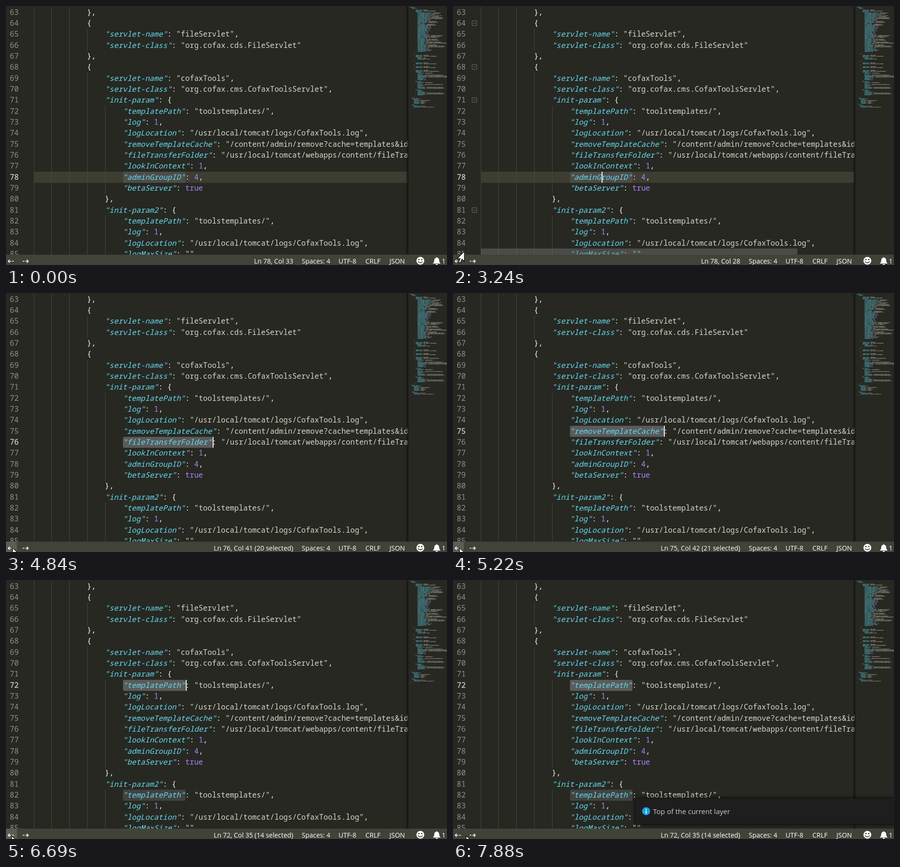
Animation of 935x550 px, one loop 8 s. Source, as an HTML page with a canvas:

```html
<!DOCTYPE html>
<html lang="en">
<head>
<meta charset="utf-8">
<title>JSON editor</title>
<style>
  html, body { margin: 0; width: 100%; height: 100%; overflow: hidden; background: #272822; }
  canvas { display: block; }
</style>
</head>
<body>
<canvas id="stage" width="935" height="550"></canvas>
<script>
const W = 935, H = 550, LOOP = 8000;
const LEFT = 59, RIGHT = 851, BAR = 528;
const CHAR = 9.47, ROW = 23.33, FIRST = 63, LAST = 85;
const MONO = '500 15.78px "Noto Sans Mono", monospace';
const UI = '"Open Sans", "Noto Sans", sans-serif';
const KEY = '#66d9ef', STRING = '#d6d6ca', NUMBER = '#ae81ff', PLAIN = '#f8f8f2';

// One document line per row: indent level, optional key, value.
const source = `0{
1web-app: {
2servlet: [
3{
4servlet-name: "cofaxCDS",
4servlet-class: "org.cofax.cds.CDSServlet",
4init-param: {
5configGlossary:installationAt: "Central Office",
5configGlossary:adminContact: "desk contact",
5configGlossary:poweredBy: "Cofax",
5configGlossary:poweredByIcon: "/images/cofax.gif",
5configGlossary:staticPath: "/content/static",
5templateProcessorClass: "org.cofax.WysiwygTemplate",
5templateLoaderClass: "org.cofax.FilesTemplateLoader",
5templatePath: "templates",
5templateOverridePath: "",
5defaultListTemplate: "listTemplate.htm",
5defaultFileTemplate: "articleTemplate.htm",
5useJSP: false,
5jspListTemplate: "listTemplate.jsp",
5jspFileTemplate: "articleTemplate.jsp",
5cachePackageTagsTrack: 200,
5cachePackageTagsStore: 200,
5cachePackageTagsRefresh: 60,
5cacheTemplatesTrack: 100,
5cacheTemplatesStore: 50,
5cacheTemplatesRefresh: 15,
5cachePagesTrack: 200,
5cachePagesStore: 100,
5cachePagesRefresh: 10,
5cachePagesDirtyRead: 10,
5searchEngineListTemplate: "forSearchEnginesList.htm",
5searchEngineFileTemplate: "forSearchEngines.htm",
5searchEngineRobotsDb: "WEB-INF/robots.db",
5useDataStore: true,
5dataStoreClass: "org.cofax.SqlDataStore",
5redirectionClass: "org.cofax.SqlRedirection",
5dataStoreName: "cofax",
5dataStoreDriver: "jdbc.sqlserver.SQLServerDriver",
5dataStoreUrl: "jdbc:sqlserver://LOCALHOST:1433;DatabaseName=goon",
5dataStoreUser: "sa",
5dataStorePassword: "dataStoreTestQuery",
5dataStoreTestQuery: "SET NOCOUNT ON;select test='test';",
5dataStoreLogFile: "/usr/local/tomcat/logs/datastore.log",
5dataStoreInitConns: 10,
5dataStoreMaxConns: 100,
5dataStoreConnUsageLimit: 100,
5dataStoreLogLevel: "debug",
5maxUrlLength: 500
4}
3},
3{
4servlet-name: "cofaxEmail",
4servlet-class: "org.cofax.cds.EmailServlet",
4init-param: {
5mailHost: "mail1",
5mailHostOverride: "mail2"
4}
3},
3{
4servlet-name: "cofaxAdmin",
4servlet-class: "org.cofax.cds.AdminServlet"
3},
3{
4servlet-name: "fileServlet",
4servlet-class: "org.cofax.cds.FileServlet"
3},
3{
4servlet-name: "cofaxTools",
4servlet-class: "org.cofax.cms.CofaxToolsServlet",
4init-param: {
5templatePath: "toolstemplates/",
5log: 1,
5logLocation: "/usr/local/tomcat/logs/CofaxTools.log",
5removeTemplateCache: "/content/admin/remove?cache=templates&id=",
5fileTransferFolder: "/usr/local/tomcat/webapps/content/fileTransferFolder",
5lookInContext: 1,
5adminGroupID: 4,
5betaServer: true
4},
4init-param2: {
5templatePath: "toolstemplates/",
5log: 1,
5logLocation: "/usr/local/tomcat/logs/CofaxTools.log",
5logMaxSize: "",
5dataLog: 1,
5dataLogLocation: "/usr/local/tomcat/logs/dataLog.log",
5removePageCache: "/content/admin/remove?cache=pages&id="
4},
4init-param3: {
5dataLog: 1,
5dataLogMaxSize: "",
5dataLogLocation: "/usr/local/tomcat/logs/dataLog.log",
5removePageCache: "/content/admin/remove?cache=pages&id=",
5lookInContext: 1
4}
3}
2],
2servlet-mapping: {
3cofaxCDS: "/",
3cofaxEmail: "/cofaxutil/aemail/*",
3cofaxAdmin: "/admin/*",
3fileServlet: "/static/*",
3cofaxTools: "/tools/*"
2},
2taglib: {
3taglib-uri: "cofax.tld",
3taglib-location: "/WEB-INF/tlds/cofax.tld"
2}
1}
0}`;

const lines = source.split('\n').map(raw => {
  const [, level, name, value] = raw.match(/^(\d)(?:([\w:-]+): )?(.*)$/);
  const indent = level * 4, key = name && `"${name}"`, tokens = [];
  let col = indent;
  if (key) {
    tokens.push({ text: key, col, color: KEY }, { text: ':', col: col + key.length, color: PLAIN });
    col += key.length + 2;
  }
  for (const m of value.matchAll(/"[^"]*"|\d+|true|false|\S/g)) {
    const color = m[0][0] === '"' ? STRING : /\w/.test(m[0]) ? NUMBER : PLAIN;
    tokens.push({ text: m[0], col: col + m.index, color });
  }
  return { indent, key, tokens };
});

// Cursor states: time, line, column (0 selects the whole key), start of the blink phase.
const states = [
  [0, 78, 33], [2240, 78, 28, 2200], [4150, 77, 0, 4150], [4840, 76, 0, 4840],
  [5090, 75, 0, 4970], [5640, 74, 0, 5640], [6040, 73, 0, 6040], [6560, 72, 0, 6560], [7230, 72, 0, 7230]
];
// Pointer steps: time, x, y.
const pointerSteps = [
  [750, 930, 535], [870, 800, 400], [1000, 660, 290], [1120, 520, 254], [1240, 400, 290],
  [1360, 300, 390], [1480, 234, 465], [1600, 255, 437], [1720, 272, 415], [1840, 290, 395],
  [1970, 308, 378], [2090, 321, 370], [2240, 318, 370], [2490, 280, 395], [2610, 220, 430],
  [2730, 160, 470], [2860, 105, 508], [2980, 69, 528], [3120, 42, 525], [3240, 24, 521],
  [3360, 16, 538], [3490, 14, 541], [5640, 12, 543], [7640, 16, 543], [7760, 22, 543], [7880, 28, 543]
];

const ctx = document.getElementById('stage').getContext('2d');
const clamp = v => Math.max(0, Math.min(1, v));
const latest = (steps, t) => steps.filter(s => s[0] <= t).pop();
const rowTop = n => 2.1 + (n - FIRST) * ROW;
const baseline = n => Math.round(18.6 + (n - FIRST) * ROW);
const colX = col => LEFT + col * CHAR;

function rect(c, color, x, y, w, h) {
  c.fillStyle = color;
  c.fillRect(x, y, w, h);
}
function label(c, text, x, y, color, font, align = 'left') {
  c.font = font;
  c.fillStyle = color;
  c.textAlign = align;
  c.fillText(text, x, y);
}
function disc(color, x, y, r) {
  ctx.fillStyle = color;
  ctx.beginPath();
  ctx.arc(x, y, r, 0, 7);
  ctx.fill();
}
function strokePath(d, color, width) {
  ctx.strokeStyle = color;
  ctx.lineWidth = width;
  ctx.stroke(new Path2D(d));
}

function drawCode(c) {
  for (let n = FIRST; n <= LAST; n++) {
    const { indent, tokens } = lines[n - 1];
    for (let col = 0; col < indent; col += 4)
      rect(c, '#464741', Math.floor(colX(col)), Math.floor(rowTop(n)), 1, 24);
    for (const { text, col, color } of tokens)
      label(c, text, colX(col) - 1, baseline(n), color, (color === KEY ? 'italic ' : '') + MONO);
    label(c, n, 27, baseline(n), '#90908a', MONO, 'right');
  }
}
function drawMinimap(c) {
  rect(c, '#272822', RIGHT, 0, W - RIGHT, BAR);
  const shade = c.createLinearGradient(RIGHT - 4, 0, RIGHT + 2, 0);
  shade.addColorStop(0, 'rgba(0,0,0,0)');
  shade.addColorStop(1, 'rgba(0,0,0,.55)');
  rect(c, shade, RIGHT - 4, 0, 6, BAR);
  lines.forEach(({ tokens }, row) => {
    for (const { text, col, color } of tokens)
      [...text].forEach((ch, i) => {
        if (ch === ' ') return;
        c.globalAlpha = /\w/.test(ch) ? 0.3 + ch.charCodeAt(0) * 7 % 10 / 30 : 0.2;
        rect(c, color, RIGHT + 1 + col + i, row * 2, 1, 1.4);
      });
  });
  c.globalAlpha = 1;
}
const page = new OffscreenCanvas(W, H);
const pageCtx = page.getContext('2d');
drawCode(pageCtx);
drawMinimap(pageCtx);

function keyBox(n, color) {
  ctx.fillStyle = color;
  ctx.beginPath();
  ctx.roundRect(colX(lines[n - 1].indent) - 0.5, rowTop(n), lines[n - 1].key.length * CHAR, ROW, 3);
  ctx.fill();
}
function drawHighlights(line, selected) {
  if (!selected) rect(ctx, '#3e3d32', LEFT, rowTop(line), RIGHT - LEFT, ROW);
  for (let n = FIRST; n < LAST; n++)
    if (lines[n - 1].key === lines[line - 1].key)
      keyBox(n, selected && n === line ? '#5a5b5a' : 'rgba(92,94,94,.5)');
}
function drawFolds(alpha) {
  ctx.globalAlpha = alpha;
  for (const n of [64, 68, 71, 81]) {
    const y = Math.floor(rowTop(n)) + 6.5;
    strokePath(`M40.5 ${y}h10v10h-10zM43 ${y + 5}h5`, '#6c6d66', 1);
  }
  ctx.globalAlpha = 1;
}
function drawToast(p) {
  const y = 464 + (1 - p) * 54;
  ctx.save();
  ctx.globalAlpha = p;
  ctx.shadowColor = '#000';
  ctx.shadowBlur = 8;
  rect(ctx, '#1e1e1e', 387, y, W - 387, 54);
  ctx.shadowBlur = 0;
  disc('#1ba1e2', 409.5, y + 27, 8.5);
  rect(ctx, '#fff', 408.5, y + 22, 2, 2);
  rect(ctx, '#fff', 408.5, y + 25.5, 2, 6.5);
  label(ctx, 'Top of the current layer', 424, y + 32.5, '#cccccc', '15px ' + UI);
  ctx.restore();
}
function drawStatus(position, hover) {
  const font = '500 14px ' + UI;
  rect(ctx, '#414339', 0, BAR, W, H - BAR);
  if (hover) rect(ctx, 'rgba(255,255,255,.14)', 0, BAR, 23, H - BAR);
  strokePath('M8 538.5l-3.5 3.5l3.5 3.5M5 542h6M13 542h3.5', '#fff', 1.3);
  strokePath('M44 538.5l3.5 3.5l-3.5 3.5M47 542h-6M39 542h-3.5', '#fff', 1.3);
  label(ctx, position, 609, 546.5, '#fff', font, 'right');
  [['Spaces: 4', 627], ['UTF-8', 705], ['CRLF', 762], ['JSON', 813], ['1', 924]]
    .forEach(([text, x]) => label(ctx, text, x, 546.5, '#fff', font));
  disc('#fff', 878.5, 541, 8.3);
  disc('#414339', 875.5, 538.5, 1.6);
  disc('#414339', 881.5, 538.5, 1.6);
  strokePath('M873.5 542.5q5 6 10 0', '#414339', 1.8);
  ctx.fillStyle = '#fff';
  ctx.fill(new Path2D('M905 547q3-3 3-7q0-4.500 4-5.200a1.200 1.200 0 0 1 2.400 0q4 .7 4 5.200q0 4 3 7zM911 548h4.500a2.200 2.200 0 0 1-4.500 0z'));
}
function drawPointer(x, y) {
  const beam = x >= LEFT && x < RIGHT && y < BAR;
  ctx.save();
  ctx.translate(x, y);
  if (beam) {
    strokePath('M-4 -8.500h3l1 1l1-1h3M0.5 -8v16M-4 8.500h3l1-1l1 1h3', '#c8c8c2', 1);
  } else {
    ctx.scale(x < LEFT && y < BAR ? -1.25 : 1.25, 1.25);
    const arrow = 'M0 0v17l4-3.800l2.800 6.300l2.700-1.200l-2.700-6.100h5.200z';
    ctx.fillStyle = '#fff';
    ctx.fill(new Path2D(arrow));
    strokePath(arrow, '#000', 0.9);
  }
  ctx.restore();
}

function draw(t) {
  const [, line, fixedCol, blinkFrom] = latest(states, t);
  const selected = !fixedCol, length = lines[line - 1].key.length;
  const col = fixedCol || 21 + length;
  const pointer = latest(pointerSteps, t);

  rect(ctx, '#272822', 0, 0, W, H);
  drawHighlights(line, selected);
  ctx.drawImage(page, 0, 0);
  label(ctx, line, 27, baseline(line), '#d8d8d4', MONO, 'right');

  if (t >= 3120) drawFolds(1 - clamp((t - 3360) / 350));
  if (blinkFrom && (t - blinkFrom) % 1040 < 520)
    rect(ctx, '#f8f8f0', Math.round(colX(col - 1)), rowTop(line), 2, ROW);
  const scrollbar = clamp((t - 700) / 100) * (1 - clamp((t - 3700) / 550));
  rect(ctx, `rgba(121,121,121,${0.45 * scrollbar})`, LEFT, 515, 671, 13);

  const rise = clamp((t - 7180) / 300);
  if (rise) drawToast(1 - (1 - rise) ** 3);

  const hover = pointer && pointer[1] < 23 && pointer[2] >= BAR && !(t >= 5640 && t < 5910);
  drawStatus(`Ln ${line}, Col ${col}` + (selected ? ` (${length} selected)` : ''), hover);
  if (pointer) drawPointer(pointer[1], pointer[2]);
}

function frame(now) {
  draw(now % LOOP);
  requestAnimationFrame(frame);
}
draw(0);
requestAnimationFrame(frame);
</script>
</body>
</html>
```
